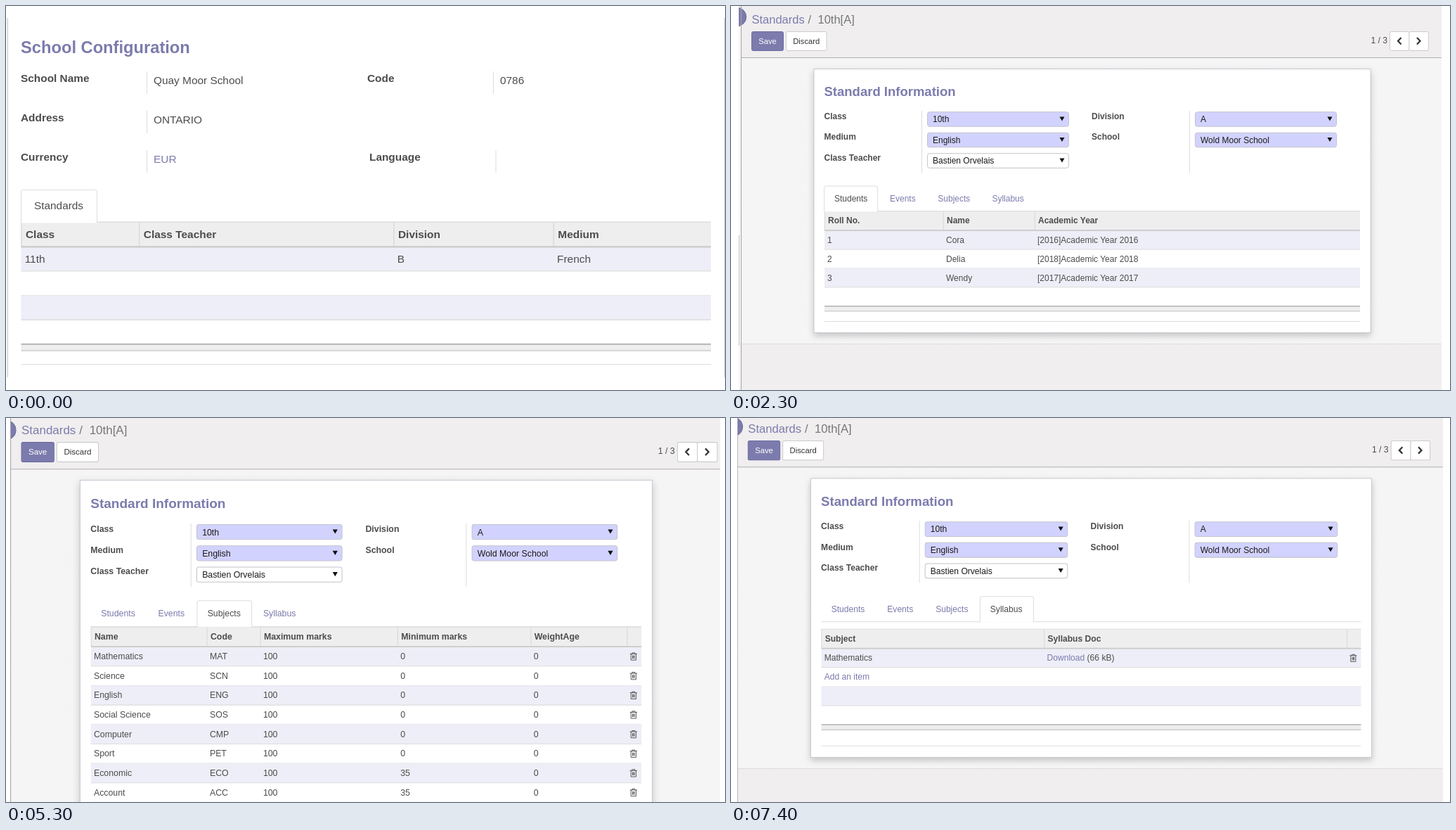
Recreate the animation shown at these times as an HTML page. Size 1023 by 546 pixels, loop 8000 ms.

```html
<!DOCTYPE html>
<html lang="en">
<head>
<meta charset="utf-8">
<title>School forms</title>
<style>
html, body { margin: 0; width: 100%; height: 100%; overflow: hidden; background: #fff; }
#stage { display: block; width: 1023px; height: 546px; font: 12px "Liberation Sans", Arial, sans-serif; }
.sheet { filter: drop-shadow(0 4px 5px #0003); }
</style>
</head>
<body>
<svg id="stage" viewBox="0 0 1023 546"></svg>
<script>
const VIOLET = '#7c7bad', INK = '#4c4c4c', RULE = '#ddd', PANEL = '#f0eeee', STRIPE = '#eeeef8';

// y is the middle of the capital letters
const text = (x, y, str, { size = 12, fill = INK, bold, anchor = 'start' } = {}) =>
  `<text x="${x}" y="${y + size * .345}" font-size="${size}" fill="${fill}" text-anchor="${anchor}"
    font-weight="${bold ? 700 : 400}">${str}</text>`;
const rect = (x, y, w, h, fill, stroke = 'none', r = 0) =>
  `<rect x="${x}" y="${y}" width="${w}" height="${h}" rx="${r}" fill="${fill}" stroke="${stroke}"/>`;
const path = (d, stroke = RULE, width = 1, fill = 'none') =>
  `<path d="${d}" stroke="${stroke}" stroke-width="${width}" fill="${fill}"/>`;
const group = (transform, body) => `<g transform="${transform}">${body}</g>`;
const link = str => `<tspan fill="${VIOLET}">${str}</tspan>`;
const tabBox = (x, y, w, h) =>
  path(`M${x} ${y + h}v${3 - h}q0-3 3-3h${w - 6}q3 0 3 3v${h - 3}`, RULE, 1, '#fff');
const trash = (x, y) => group(`translate(${x} ${y})`,
  path('M-5-3.5H5M-2-3.5v-1.5h4v1.5M-3.5-3.5v8.5h7v-8.5M-1.3-1.5v4.5M0-1.5v4.5M1.3-1.5v4.5', INK, .9));

const TABLE_W = 762, HEAD_H = 27.4, ROW_H = 26.9;

function table(cols, rows, hasTrash) {
  const count = Math.max(4, rows.length), bottom = HEAD_H + count * ROW_H;
  let out = rect(0, 0, TABLE_W, HEAD_H, '#eee') + path(`M0 .2H${TABLE_W}`);
  for (const [x, label] of cols)
    out += path(`M${x + .3} 0V${HEAD_H}`, '#d8d8d8') + text(x + 5, HEAD_H / 2 - .3, label, { bold: true });
  for (let i = 0; i < count; i++) {
    const y = HEAD_H + i * ROW_H, cells = rows[i] || [];
    if (i % 2 == 0) out += rect(0, y, TABLE_W, ROW_H, STRIPE);
    out += path(`M0 ${y + ROW_H}H${TABLE_W}`);
    cells.forEach((cell, c) => out += text(cols[c][0] + 4, y + 13.4, cell));
    if (hasTrash && cells.length > 1) out += trash(751, y + 13.5);
  }
  return out + path(`M0 ${HEAD_H}H${TABLE_W}`, '#cacaca', 1.8)
    + rect(0, bottom, TABLE_W, 7.2, '#eee')
    + path(`M0 ${bottom}H${TABLE_W}`, '#bbb', 1.8)
    + path(`M0 ${bottom + 7.2}H${TABLE_W}`, '#c4c4c4');
}

function schoolForm() {
  const size = 15.4, label = { size, bold: true };
  const field = (x, lineX, y, name, value, fill = INK) =>
    text(x, y, name, label) + path(`M${lineX} ${y - 9.7}v32`) + text(lineX + 9.5, y + 2.5, value, { size, fill });
  return rect(0, 17, 2, 511, 'url(#weave)')
    + path('M2.5 17V528M1022.5 17V528', '#c8c8d3')
    + text(21, 58.5, 'School Configuration', { size: 23.7, bold: true, fill: VIOLET })
    + field(21, 200.5, 102.7, 'School Name', 'Quay Moor School')
    + field(514, 693.5, 102.7, 'Code', '0786')
    + field(21, 200.5, 158.7, 'Address', 'ONTARIO')
    + field(21, 200.5, 214.7, 'Currency', 'EUR', VIOLET)
    + field(517, 697, 214.7, 'Language', '')
    + group('translate(21.5 307) scale(1.288)', table(
        [[0, 'Class'], [130.3, 'Class Teacher'], [411.5, 'Division'], [588, 'Medium']],
        [['11th', '', 'B', 'French']]))
    + tabBox(21.5, 261.5, 108, 47)
    + text(75, 283.7, 'Standards', { size, anchor: 'middle' })
    + path('M21 509.5H1003');
}

function select(x, y, value, fill = '#d2d2ff') {
  return rect(x, y - 10.3, 201, 20.6, fill, '#c4c4cc', 3)
    + text(x + 7.5, y + .3, value, { fill: '#1a1a1a' })
    + path(`M${x + 188} ${y - 3.5}h7l-3.5 6z`, 'none', 0, '#111');
}

function header(circleY) {
  const button = (x, w, fill, stroke) => rect(x, 36.5, w, 27, fill, stroke, 2);
  const big = { size: 16.5, fill: '#777' }, small = { size: 11.2, anchor: 'middle' };
  return rect(-30, -20, 1100, 93, PANEL)
    + path('M14.5 73.5H1100', '#b0aeb4')
    + `<circle cx="8.5" cy="${circleY}" r="13.2" fill="${VIOLET}" stroke="#6a6999"/>`
    + text(29.5, 19.5, 'Standards', { ...big, fill: VIOLET })
    + text(109.5, 19.5, '/', big) + text(123.5, 19.5, '10th[A]', big)
    + button(29.5, 45, VIOLET, '#6d6ca3') + text(52, 49.8, 'Save', { ...small, fill: '#fff' })
    + button(78.5, 57.5, '#fff', '#ccc') + text(107.2, 49.8, 'Discard', { ...small, fill: '#333' })
    + text(910.5, 48.5, '1 / 3')
    + button(937.5, 27.5, '#fff', '#ccc') + button(965, 27.5, '#fff', '#ccc')
    + path('M953.5 45l-4.5 4.7 4.5 4.7M976 45l4.5 4.7-4.5 4.7', '#333', 2.2);
}

const TABS = [['Students', 147, 76], ['Events', 226, 66], ['Subjects', 294.3, 75.5], ['Syllabus', 371.4, 75.5]];

function standardForm({ left, right, scale, dx, dy, headX = 0, headY = 0, circleY,
                        active, tableY, bottom, ruleY, body, edge = '' }) {
  const label = (x, y, str) => text(x, y, str, { bold: true });
  const sheet = rect(118, 89.5, 792, bottom - 89.5, '#fff', '#c8c8d3').replace('<rect', '<rect class="sheet"')
    + text(132.5, 122, 'Standard Information', { size: 18.5, bold: true, fill: VIOLET })
    + label(132.5, 156.7, 'Class') + label(132.5, 186.2, 'Medium') + label(132.5, 215.7, 'Class Teacher')
    + label(513, 156.7, 'Division') + label(513, 186.2, 'School')
    + path('M271.5 149V237M652.5 149V237')
    + select(279.5, 161, '10th') + select(279.5, 190.5, 'English')
    + select(279.5, 220, 'Bastien Orvelais', '#fff')
    + select(660.5, 161, 'A') + select(660.5, 190.5, 'Wold Moor School')
    + path('M133 291.8H895')
    + group(`translate(133 ${tableY})`, body)
    + TABS.map(([name, x, w], i) => (i == active ? tabBox(x - 14.3, 256, w, 36.5) : '')
        + text(x, 273.7, name, { fill: i == active ? INK : VIOLET })).join('')
    + path(`M133 ${ruleY}H895`);
  const footer = rect(-30, bottom + 16, 1100, 300, PANEL) + path(`M-30 ${bottom + 16}H1100`);
  const place = (x, y, inner) => group(`translate(${dx + x} ${dy + y}) scale(${scale})`, inner);
  return `<svg x="${left}" width="${right - left}" height="546" viewBox="${left} 0 ${right - left} 546">`
    + rect(0, 0, 1023, 546, 'url(#weave)')
    + place(0, 0, footer + sheet)
    + place(headX, headY, header(circleY) + path('M14.5 -20V600', '#a5a3a8'))
    + edge + '</svg>';
}

const subjects = ['Mathematics MAT', 'Science SCN', 'English ENG', 'Social Science SOS', 'Computer CMP',
  'Sport PET', 'Economic ECO', 'Account ACC', ' '].map((s, i) => {
    const cut = s.lastIndexOf(' ');
    return [s.slice(0, cut), s.slice(cut + 1), '100', i < 6 ? '0' : '35', '0'];
  });

const scenes = [
  [500, schoolForm()],
  [3500, standardForm({
    left: 11, right: 1011, scale: 1, dx: 0, dy: 0, circleY: 15.5,
    active: 0, tableY: 291.8, bottom: 464.5, ruleY: 448.5,
    body: table([[0, 'Roll No.'], [169, 'Name'], [299, 'Academic Year']],
      [['Cora', 2016], ['Delia', 2018], ['Wendy', 2017]]
        .map(([name, year], i) => [i + 1, name, `[${year}]Academic Year ${year}`])),
    edge: rect(11, 30, 3, 516, '#f7f6f6') + path('M11.5 326V483', '#c4c2c6')
  })],
  [6500, standardForm({
    left: 6, right: 1016, scale: 1.028, dx: -15.9, dy: -3.5, headX: 7.6, headY: .6, circleY: 19.5,
    active: 2, tableY: 292.3, bottom: 700, ruleY: 680,
    body: table([[0, 'Name'], [160.5, 'Code'], [234.4, 'Maximum marks'], [424.4, 'Minimum marks'],
      [608.7, 'WeightAge'], [742, '']], subjects, true)
  })],
  [8000, standardForm({
    left: 9, right: 1013, scale: 1.0076, dx: -5.4, dy: -4.2, circleY: 16.5,
    active: 3, tableY: 302, bottom: 483, ruleY: 467,
    body: table([[0, 'Subject'], [314.5, 'Syllabus Doc'], [742, '']],
      [['Mathematics', link('Download') + ' (66 kB)'], [link('Add an item')]], true)
  })]
];

const stage = document.getElementById('stage');
stage.innerHTML = `<defs><pattern id="weave" width="4" height="4" patternUnits="userSpaceOnUse">
  <path d="M0 0h4v4h-4z" fill="#f8f8f8"/><path d="M0 0h1v1h-1zM1 1h1v1h-1zM2 2h1v1h-1zM3 3h1v1h-1z" fill="#ececec"/>
  </pattern></defs>` + scenes.map(([, body]) => `<g class="scene">${body}</g>`).join('');
const layers = stage.querySelectorAll('.scene');

function draw() {
  const time = performance.now() % 8000;
  const current = scenes.findIndex(([end]) => time < end);
  layers.forEach((layer, i) => layer.style.display = i == current ? '' : 'none');
  requestAnimationFrame(draw);
}
draw();
</script>
</body>
</html>
```
